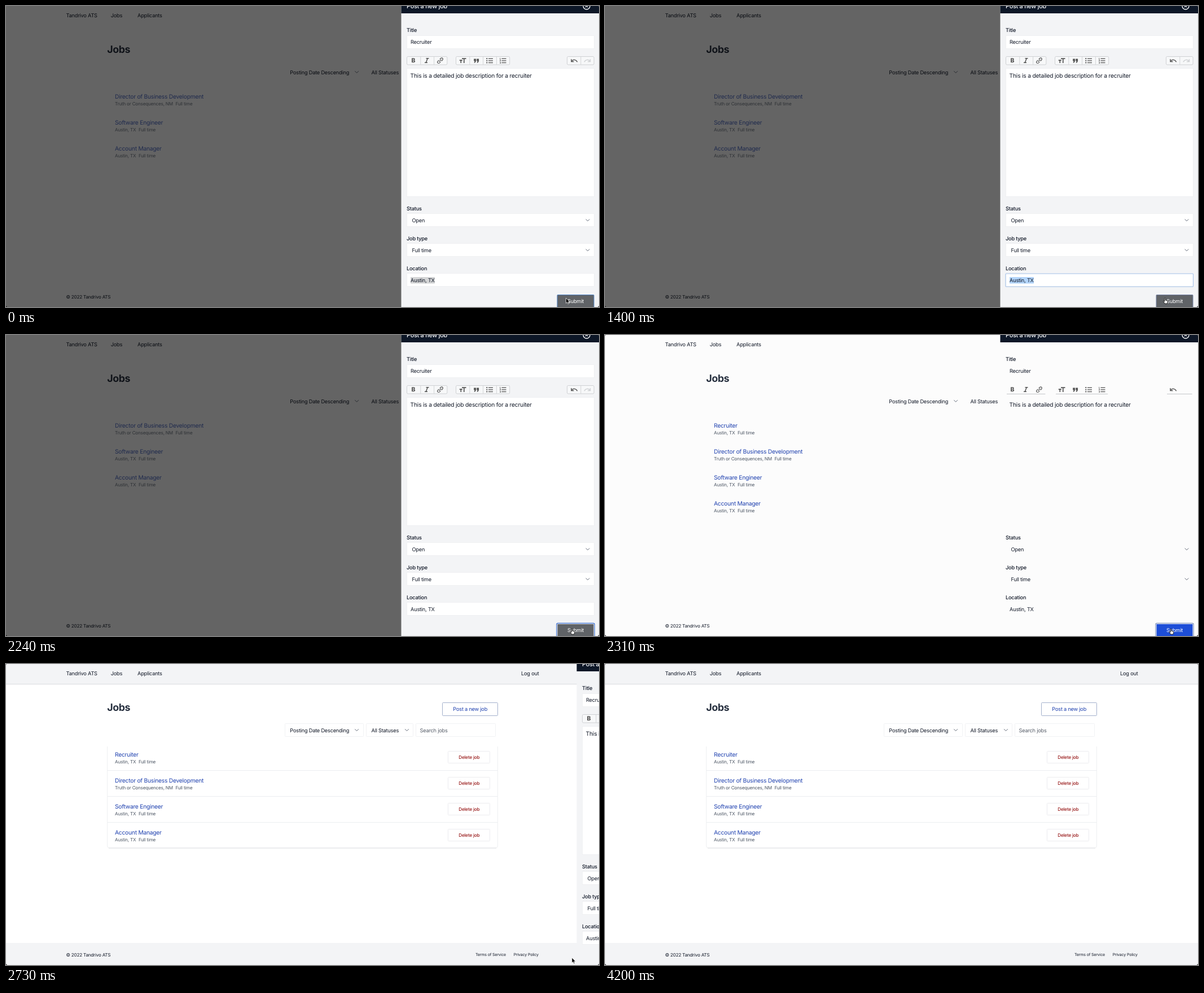
Write an HTML page that moves like this. It is 1051 px wide and 533 px high and loops after 4.27 s.

```html
<!DOCTYPE html>
<html lang="en">
<head>
<meta charset="utf-8">
<title>Post a new job</title>
<style>
  html, body { margin: 0; width: 100%; height: 100%; overflow: hidden; background: #fcfcfc; }
  svg { display: block; width: 1051px; height: 533px; }
  text { font: 400 9.25px Inter, "Liberation Sans", sans-serif; letter-spacing: -.025em; fill: #111827; text-rendering: geometricPrecision; }
  .h1 { font-size: 17.8px; font-weight: 700; fill: #27303f; }
  .job { font-size: 10.25px; letter-spacing: -.023em; fill: #1e40af; }
  .sub { font-size: 8.1px; fill: #4b5563; }
  .small { font-size: 8.1px; }
  .tiny { font-size: 7.05px; }
  .hint { fill: #565d68; }
  .post { fill: #1e40af; }
  .del { font-size: 8.1px; font-weight: 500; fill: #991b1b; }
  .label { font-weight: 500; }
  .body { font-size: 10.25px; letter-spacing: -.02em; }
  .head { font-size: 10.9px; font-weight: 500; fill: #fff; }
  .btn { fill: #fff; }
  .mid { text-anchor: middle; }
  .icon { fill: #555; font-weight: 800; letter-spacing: 0; }
  .line { fill: none; stroke: #555; stroke-width: 1.2; }
</style>
</head>
<body>
<svg id="stage" viewBox="0 0 1051 533" xmlns="http://www.w3.org/2000/svg"></svg>
<script>
const LOOP = 4270, STEP = 70;
const T = { hand: 700, focus: 910, click: 2170, saved: 2310, slide: 2423, shaded: 2590, hide: 3570 };
const SLIDE_MS = 500, DRAWER_X = 700.5, DRAWER_W = 350.5;

const text = (x, y, s, cls = '') => `<text x="${x}" y="${y}" class="${cls}">${s}</text>`;
const rect = (x, y, w, h, fill, stroke = 'none', r = 0, more = '') =>
  `<rect x="${x}" y="${y}" width="${w}" height="${h}" rx="${r}" fill="${fill}" stroke="${stroke}" ${more}/>`;
const path = (d, color, w = 1, more = '') =>
  `<path d="${d}" fill="none" stroke="${color}" stroke-width="${w}" ${more}/>`;
const chevron = (x, y) => path(`M${x - 3} ${y - 1.5}l3 3 3-3`, '#596170', .95, 'stroke-linecap="round"');
const group = (id, s) => `<g id="${id}">${s}</g>`;

function job(i, title, place) {
  const y = 46 * i;
  return text(193, 163.5 + y, title, 'job') +
    `<text x="193" y="${176.2 + y}" class="sub">${place}<tspan dx="4.6">Full time</tspan></text>`;
}

function shading() {
  let s = rect(0, 0, 1051, 533, '#fff') +
    rect(0, 0, 1051, 35, '#f3f4f6') + rect(0, 35, 1051, 1, '#dfe1e4') + rect(0, 36, 1051, 1, '#f6f6f7') +
    rect(0, 494, 1051, 39, '#f3f4f6') +
    rect(773.5, 68.5, 98, 23, '#fff', '#a3b0cc', 1) +
    [[494.5, 139], [638.5, 83], [726.5, 141]].map(([x, w]) => rect(x, 105.5, w, 23, '#fff', '#f1f2f4', 1)).join('') +
    path('M179.5 146V322q0 3.5 3.5 3.5H868q3.5 0 3.5-3.5V146', '#eeeff1') +
    path('M182 326H869', '#dfe1e4');
  for (let i = 0; i < 4; i++) {
    if (i) s += rect(180, 142 + 46 * i, 691, 1, '#eceef0');
    s += rect(783.5, 154.5 + 46 * i, 74, 21, '#fff', '#ececef', 1);
  }
  return s;
}

function page() {
  const deletes = [0, 1, 2, 3].map(i => text(820.8, 168.2 + 46 * i, 'Delete job', 'del mid')).join('');
  return group('shade', shading()) +
    text(106.5, 19.8, 'Tandrivo ATS') + text(185.7, 19.8, 'Jobs') + text(233, 19.8, 'Applicants') +
    text(913, 19.8, 'Log out') +
    text(179.3, 83.3, 'Jobs', 'h1') + text(822.7, 83.2, 'Post a new job', 'post mid') +
    text(503.3, 120.5, 'Posting Date Descending') + chevron(621.7, 117) +
    text(647.5, 120.5, 'All Statuses') + chevron(710.5, 117) + text(733.5, 120.5, 'Search jobs', 'hint') +
    group('added', job(0, 'Recruiter', 'Austin, TX')) +
    group('jobs', job(0, 'Director of Business Development', 'Truth or Consequences, NM') +
      job(1, 'Software Engineer', 'Austin, TX') + job(2, 'Account Manager', 'Austin, TX')) +
    deletes +
    text(106.5, 517.6, '© 2022 Tandrivo ATS', 'small') +
    text(832, 517.2, 'Terms of Service', 'tiny') + text(899.7, 517.2, 'Privacy Policy', 'tiny');
}

// Toolbar outlines: left edge and number of buttons
const bars = [[710.5, 3], [797.5, 4], [994.5, 2]];

function fields() {
  const box = (y, h) => rect(710.5, y, 332, h, '#fff', '#eff0f2');
  return box(52.5, 23) + box(110.5, 227) + box(367.5, 23) + box(420.5, 23) + box(473.5, 23) +
    bars.map(([x, n]) => {
      let s = rect(x, 89.5, n * 23.8, 14.5, '#f7f8f9', '#cfd1d4', 2);
      for (let i = 1; i < n; i++) s += rect(x + 23.8 * i, 90, 1, 14, '#d3d5d8');
      return s;
    }).join('') + undo(1030.5, -1, '#cfd1d4');
}

const undo = (x, dir, color) =>
  `<g transform="translate(${x} 96.5) scale(${dir} 1)">` +
  path('M-5-2.5v4.5h4.5M-4.6 1.6C-2-2.5 3.5-2 5.5 2.8', color, 1.4) + '</g>';

function icons() {
  const rows = [-3.6, 0, 3.6];
  const list = (x, mark) => rows.map((dy, i) =>
    mark(x - 4.7, 96.8 + dy, i) + rect(x - 2, 96.2 + dy, 8, 1.3, '#555')).join('');
  const dot = (x, y) => `<circle cx="${x}" cy="${y}" r="1.15" fill="#555"/>`;
  const num = (x, y, i) => `<text x="${x - 1}" y="${y + 1.5}" class="icon" style="font-size:4px">${i + 1}</text>`;
  return '<text x="722" y="100.3" class="icon mid" style="font-size:10.5px">B</text>' +
    path('M744.5 92.8h5M742 100.2h5M747.2 92.8l-2.8 7.4', '#555', 1.5) +
    `<g transform="translate(769.5 96.7) rotate(-45)" class="line">
      <path d="M-1-2.1h-2.8a2.1 2.1 0 0 0 0 4.2h2.8M1-2.1h2.8a2.1 2.1 0 0 1 0 4.2h-2.8M-2.6 0h5.2"/></g>` +
    path('M808 93.2h7.5M811.8 93v8M803.8 96.2h5M806.3 96v5', '#555', 1.7) +
    [829.2, 834.2].map(x => `<path d="M${x} 93.6h3.9v4l-1.6 2.8h-2l1.3-2.8h-1.6z" fill="#555"/>`).join('') +
    list(857, dot) + list(880.5, num) + undo(1007, 1, '#555');
}

function drawer() {
  return rect(DRAWER_X, 0, DRAWER_W, 533, '#f3f4f6', 'none', 0, 'id="panel"') +
    rect(DRAWER_X, 0, DRAWER_W, 13, '#0d1727') + text(710, 4.4, 'Post a new job', 'head') +
    '<circle cx="1029" cy="0" r="6" fill="none" stroke="#fff" stroke-width="1.3"/>' +
    path('M1026.8-2.2l4.4 4.4M1031.2-2.2l-4.4 4.4', '#fff', 1.2) +
    group('fields', fields()) +
    group('rules', bars.map(([x, n]) => rect(x + 1.5, 104, n * 23.8 - 3, 1, '#c4c6c9')).join('')) +
    icons() +
    rect(710, 474, 332.5, 23, 'none', '#a6c3ea', 1, 'id="focus" stroke-width="1.1"') +
    rect(717, 480, 43, 11.5, '#d4d5d6', 'none', 0, 'id="selection"') +
    text(710, 46.4, 'Title', 'label') + text(717, 67.2, 'Recruiter') +
    text(716.6, 126.5, 'This is a detailed job description for a recruiter', 'body') +
    text(710, 362.2, 'Status', 'label') + text(719.5, 383, 'Open') + chevron(1031, 379.3) +
    text(710, 415.2, 'Job type', 'label') + text(719.5, 436, 'Full time') + chevron(1031, 432.3) +
    text(710, 468.2, 'Location', 'label') + text(717, 489, 'Austin, TX') +
    rect(976, 510.5, 67, 26, '#fff', '#6d8fd0', 2, 'id="ring" stroke-width="1.5"') +
    rect(977, 511.5, 65, 24, '#606367', '#4f83c4', 1, 'id="submit"') +
    text(1009.5, 526, 'Submit', 'btn mid');
}

const pointer =
  '<path id="arrow" d="M0 0V9.3L2.1 7.4 3.6 10.7 5.1 10 3.6 6.9H6.5Z" fill="#000" stroke="#fff" stroke-width=".7"/>' +
  '<path id="hand" d="M-.8 1.2q0-1.1.8-1.1t.8 1.1V4l3.2.8q1 .3.9 1.4L4.3 8.6 3.6 10H-.2L-2.8 6.6q-.5-1 .4-1.2L-.8 6.4Z" fill="#fff" stroke="#111" stroke-width=".9"/>';

document.getElementById('stage').innerHTML =
  rect(0, 0, 1051, 533, '#fcfcfc') + page() +
  rect(0, 0, 1051, 533, '#000', 'none', 0, 'id="dim" opacity=".6"') +
  group('drawer', drawer()) +
  '<path d="M0 530q0 3 3 3H0ZM1051 530q0 3-3 3h3Z" fill="#000"/>' +
  '<path d="M0 2q0-2 2-2H0ZM1051 2q0-2-2-2h2Z" fill="#777"/>' +
  group('cursor', pointer);

const el = {};
document.querySelectorAll('[id]').forEach(n => el[n.id] = n);
const show = (n, on) => n.style.display = on ? '' : 'none';
const set = (n, attrs) => { for (const k in attrs) n.setAttribute(k, attrs[k]); };
const clamp = v => Math.min(1, Math.max(0, v));
const smooth = v => v * v * (3 - 2 * v);
const span = (t, a, b) => smooth(clamp((t - a) / (b - a)));

// cubic-bezier(.4, 0, .2, 1)
function ease(x) {
  let lo = 0, hi = 1;
  for (let i = 0; i < 20; i++) {
    const s = (lo + hi) / 2, r = 1 - s;
    if (1.2 * s * r * r + .6 * s * s * r + s * s * s < x) lo = s; else hi = s;
  }
  return smooth(lo);
}

function draw(t) {
  const open = t < T.saved, clicked = t >= T.click, shaded = t >= T.shaded;
  const focused = t >= T.focus && !clicked;
  const dx = Math.round(DRAWER_W * ease(clamp((t - T.slide) / SLIDE_MS)));
  const hover = dx < 26;

  show(el.dim, open);
  show(el.shade, shaded);
  show(el.added, !open);
  set(el.jobs, { transform: `translate(0 ${open ? 0 : 46})`, opacity: open ? .8 : 1 });

  show(el.drawer, dx < DRAWER_W - 1);
  set(el.drawer, { transform: `translate(${dx} 0)` });
  set(el.panel, { fill: open || shaded ? '#f3f4f6' : '#fcfcfc' });
  show(el.fields, open || shaded);
  show(el.rules, !open && !shaded);

  show(el.focus, focused);
  set(el.focus, { opacity: t < T.focus + STEP ? .5 : 1 });
  show(el.selection, !clicked);
  set(el.selection, { fill: focused ? '#b3d5fb' : '#d4d5d6' });
  show(el.ring, clicked);
  set(el.ring, { stroke: open ? '#3b6fd0' : '#8496bd' });
  set(el.submit, {
    fill: open ? '#606367' : hover ? '#1d4ed8' : '#3b82f6',
    stroke: clicked ? '#e8ecf5' : focused ? '#7583a6' : '#4f83c4'
  });

  const nudge = span(t, 1540, 1890), leave = span(t, 3010, 3220);
  const x = 992.5 + 10.5 * nudge - 199 * leave;
  const y = 517 + 3 * nudge - 111 * leave;
  const hand = t >= T.hand && hover;
  set(el.cursor, { transform: `translate(${x.toFixed(2)} ${y.toFixed(2)})` });
  show(el.cursor, t < T.hide);
  show(el.arrow, !hand);
  show(el.hand, hand);
}

const start = performance.now();
function tick() {
  const t = (performance.now() - start) % LOOP;
  draw(Math.floor(t / STEP) * STEP);
  requestAnimationFrame(tick);
}
tick();
</script>
</body>
</html>
```
